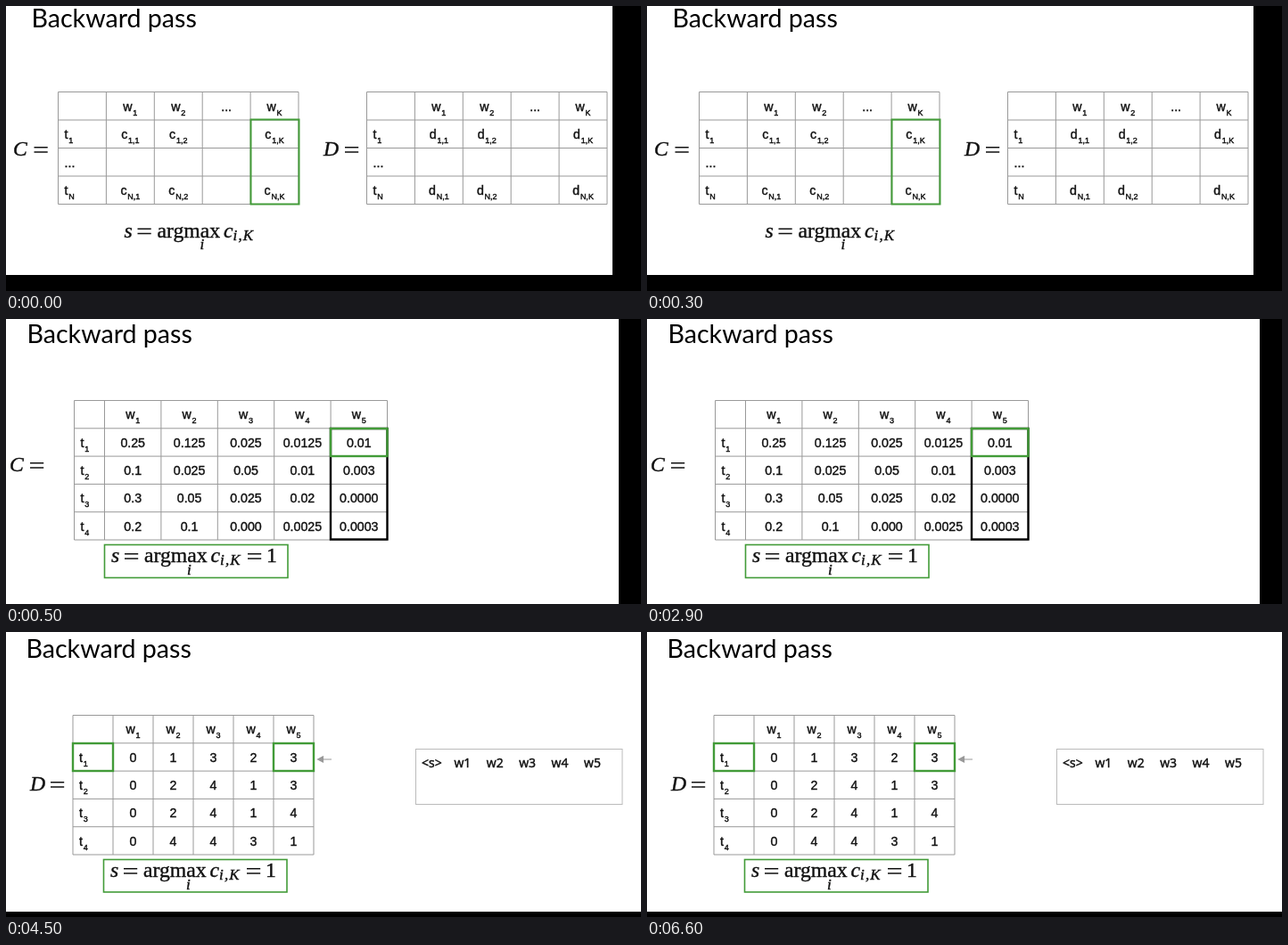
An HTML page that plays this animation: 712 by 320 pixels, repeating every 8 s.

```html
<!DOCTYPE html>
<html lang="en">
<head>
<meta charset="utf-8">
<title>Backward pass</title>
<style>
  html, body { margin: 0; width: 100%; height: 100%; overflow: hidden; background: #fff; }
  svg { display: block; width: 712px; height: 320px; }
  text { fill: #111; white-space: pre; }
  .title { font: 28.6px Lato, sans-serif; fill: #000; }
  .cell { font: 14.2px "Liberation Sans", Arial, sans-serif; stroke: #111; stroke-width: .4; }
  .sub { font-size: 9px; }
  .mid { text-anchor: middle; }
  .math { font: 23.7px "Liberation Serif", Times, serif; stroke: #111; stroke-width: .4; }
  .it { font-style: italic; }
  .small { font-size: 17px; letter-spacing: 1.2px; }
  .words { font: 14px "Open Sans", sans-serif; stroke: #111; stroke-width: .45; }
  .grid { stroke: #999; stroke-width: 1; fill: none; }
  .equals { stroke: #111; stroke-width: 1.4; }
</style>
</head>
<body>
<svg viewBox="0 0 712 320"></svg>
<script>
const GREEN = '#429b38';
const LOOP = 8000;
const stage = document.querySelector('svg');

function add(parent, tag, attrs = {}, content = '') {
  const node = document.createElementNS('http://www.w3.org/2000/svg', tag);
  for (const key in attrs) node.setAttribute(key, attrs[key]);
  node.textContent = content;
  parent.append(node);
  return node;
}

const write = (g, cls, x, y, content) => add(g, 'text', { class: cls, x, y }, content);

const bar = (g, x, y, width, height) => add(g, 'rect', { x, y, width, height });

const frame = (g, x1, y1, x2, y2, stroke = GREEN, width = 2) =>
  add(g, 'rect', { x: x1, y: y1, width: x2 - x1, height: y2 - y1, fill: 'none', stroke, 'stroke-width': width });

// "c_1,K" becomes a letter with a lowered index
function label(g, cls, x, y, content) {
  const [base, index] = content.split('_');
  const node = write(g, cls, x, y, base);
  if (index) add(node, 'tspan', { class: 'sub', dx: .8, dy: 5 }, index);
}

function table(g, xs, ys, rows, baselines, leftPad) {
  const lines = xs.map(x => `M${x} ${ys[0]}V${ys.at(-1)}`)
    .concat(ys.map(y => `M${xs[0]} ${y}H${xs.at(-1)}`));
  add(g, 'path', { class: 'grid', d: lines.join('') });
  rows.forEach((row, r) => row.split(' ').forEach((content, c) => {
    if (content === '-') return;
    if (c === 0) label(g, 'cell', xs[0] + leftPad, baselines[r], content);
    else label(g, 'cell mid', (xs[c] + xs[c + 1]) / 2, baselines[r], content);
  }));
}

function equals(g, x, y) {
  add(g, 'path', { class: 'equals', d: `M${x} ${y - 9.2}h15.2m-15.2 5.2h15.2` });
}

function matrixName(g, name, x, y, gap) {
  write(g, 'math it', x, y, name);
  equals(g, x + gap, y);
}

function formula(g, x, y, result) {
  write(g, 'math it', x, y, 's');
  equals(g, x + 15, y);
  write(g, 'math', x + 37, y, 'argmax');
  write(g, 'math it small', x + 85, y + 13.7, 'i');
  write(g, 'math it', x + 111.5, y, 'c');
  write(g, 'math it small', x + 122, y + 3, 'i,K');
  if (!result) return;
  equals(g, x + 153, y);
  write(g, 'math', x + 174, y, result);
}

const steps = (start, size, count) => Array.from({ length: count }, (_, i) => start + i * size);

function general(g) {
  write(g, 'title', 28.5, 24, 'Backward pass');
  const ys = steps(96.5, 31.5, 5);
  const baselines = [118, 149, 181, 212];
  [['C', 'c', 58.5, 8, 23.5], ['D', 'd', 404.5, 356, 24]].forEach(([name, v, x, nameX, gap]) => {
    table(g, steps(x, 53.9, 6), ys, [
      '- w_1 w_2 ... w_K',
      `t_1 ${v}_1,1 ${v}_1,2 - ${v}_1,K`,
      '...',
      `t_N ${v}_N,1 ${v}_N,2 - ${v}_N,K`
    ], baselines, 7);
    matrixName(g, name, nameX, 168, gap);
  });
  frame(g, 274.5, 127.5, 328.5, 222.5);
  formula(g, 132.5, 259.5);
  bar(g, 680, 0, 32, 320);
  bar(g, 0, 302, 712, 18);
}

function scores(g) {
  write(g, 'title', 23.5, 27, 'Backward pass');
  table(g, [76.5, ...steps(110.5, 63.4, 6)], steps(91.5, 31.3, 6), [
    '- w_1 w_2 w_3 w_4 w_5',
    't_1 0.25 0.125 0.025 0.0125 0.01',
    't_2 0.1 0.025 0.05 0.01 0.003',
    't_3 0.3 0.05 0.025 0.02 0.0000',
    't_4 0.2 0.1 0.000 0.0025 0.0003'
  ], [112, 143.5, 175, 206, 237.5], 7);
  frame(g, 364, 123, 427.5, 247.5, '#000', 2.4);
  frame(g, 364, 123, 427.5, 154, GREEN, 2.4);
  matrixName(g, 'C', 4, 171, 23);
  frame(g, 110.5, 253.5, 316, 290.5, GREEN, 1.6);
  formula(g, 118, 273, '1');
  bar(g, 687, 0, 25, 320);
}

function pointers(g) {
  write(g, 'title', 22.5, 29, 'Backward pass');
  table(g, steps(75, 45, 7), steps(93.5, 31.3, 6), [
    '- w_1 w_2 w_3 w_4 w_5',
    't_1 0 1 3 2 3',
    't_2 0 2 4 1 3',
    't_3 0 2 4 1 4',
    't_4 0 4 4 3 1'
  ], [114, 145.5, 177, 208, 239.5], 7);
  frame(g, 75, 125, 120, 156, GREEN, 2.4);
  frame(g, 300, 125, 345, 156, GREEN, 2.4);
  add(g, 'path', { d: 'M365 143H352M355.5 139.8L349.5 143L355.5 146.2Z', fill: '#999', stroke: '#999', 'stroke-width': 1.1 });
  matrixName(g, 'D', 27, 178, 23);
  frame(g, 109.5, 255.5, 315, 292, GREEN, 1.6);
  formula(g, 117, 275, '1');
  frame(g, 459.5, 131.5, 691, 193.5, '#bbb', 1);
  ['<s>', 'w1', 'w2', 'w3', 'w4', 'w5'].forEach((word, i) =>
    write(g, 'words', 466 + i * 36.4, 152, word));
  bar(g, 0, 314, 712, 6);
}

const scenes = [[general, 0, 500], [scores, 500, 4500], [pointers, 4500, LOOP]];

for (const [draw, start, end] of scenes) {
  const g = add(stage, 'g', { opacity: 0 });
  draw(g);
  const from = start / LOOP, to = end / LOOP;
  const keys = [];
  if (from > 0) keys.push({ opacity: 0, offset: 0 }, { opacity: 0, offset: from });
  keys.push({ opacity: 1, offset: from }, { opacity: 1, offset: to });
  if (to < 1) keys.push({ opacity: 0, offset: to }, { opacity: 0, offset: 1 });
  g.animate(keys, { duration: LOOP, iterations: Infinity });
}
</script>
</body>
</html>
```
